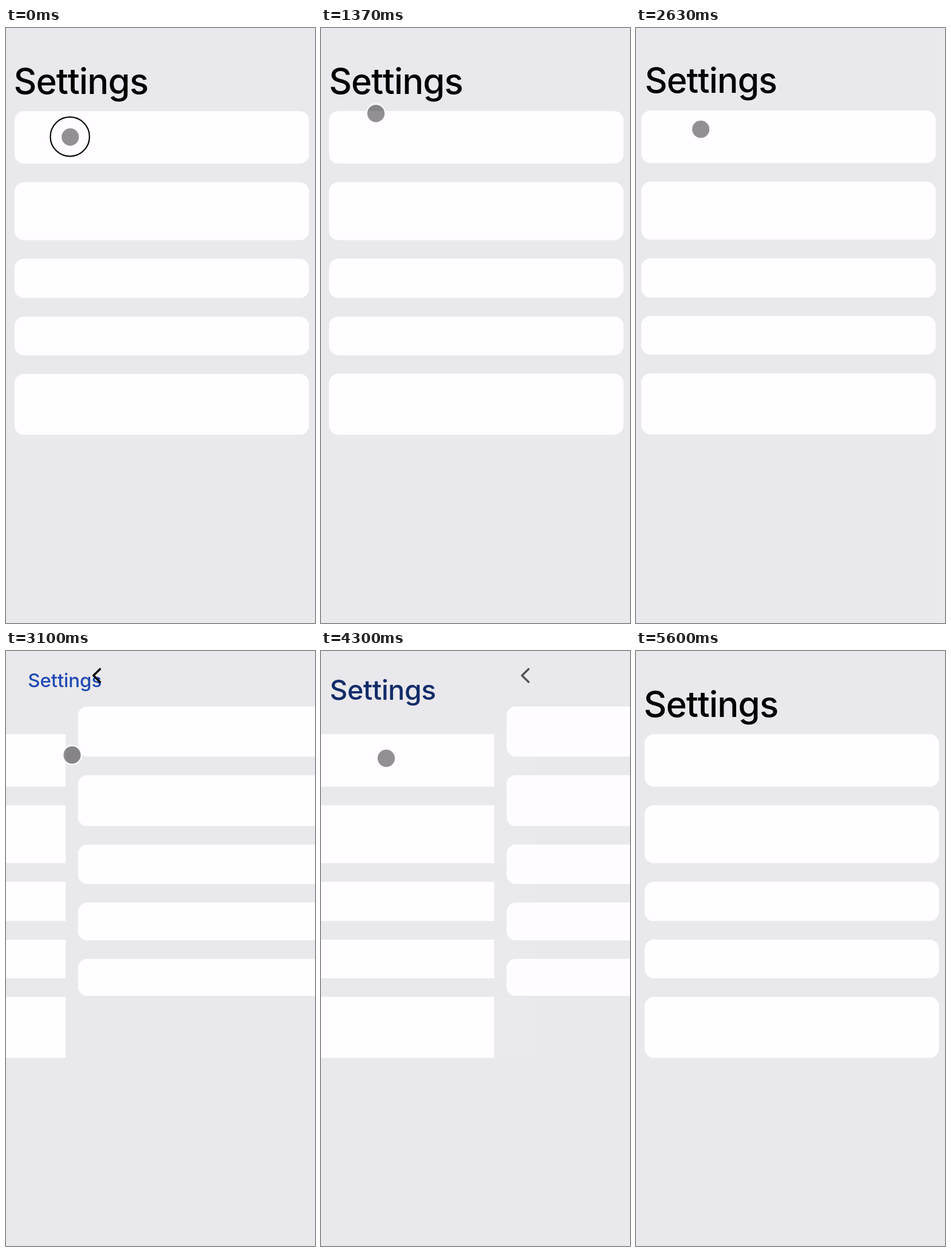
These frames come from a looping animation (540 px wide and 1037 px high, 6560 ms). An HTML page with a canvas:

```html
<!DOCTYPE html>
<html lang="en">
<head>
<meta charset="utf-8">
<title>Settings</title>
<style>
  html, body { margin: 0; width: 100%; height: 100%; overflow: hidden; background: #e9e8ec; }
  canvas { display: block; width: 540px; height: 1037px; }
</style>
</head>
<body>
<canvas id="stage" width="540" height="1037"></canvas>
<script>
const ctx = document.getElementById('stage').getContext('2d');
const W = 540, H = 1037, LOOP = 6560;
const BG = '#e9e8ec', CARD = '#fffdff';
const SPRING = 0.016, PARALLAX = 360, TRAVEL = 350, RING_TIME = 200;
const CARD_GAP = 32.4, POINTER_END = 5600;

const mainPage = { top: 145, heights: [91.4, 101, 68.4, 67.3, 106.4] };
const detailPage = { top: 96.7, heights: [87.3, 88.7, 68.5, 65.8, 64.5] };

// Taps alternately open the detail page and go back
const tap = (down, slide, x, y) => ({ down, slide, x, y });
const taps = [
  tap(-100, 270, 112.3, 190), tap(750, 860, 62, 66),
  tap(1503, 1560, 112, 188), tap(2188, 2250, 62, 66),
  tap(2700, 2916, 119, 189), tap(3401, 3626, 56, 48.5),
  tap(4031, 4210, 114, 187), tap(4700, 4860, 56, 44)
];
const stops = [...taps, tap(5370, Infinity, 353, 139)];

const lerp = (a, b, p) => a + (b - a) * p;
const clamp = v => Math.max(0, Math.min(1, v));
const smooth = u => u * u * (3 - 2 * u);

// Critically damped spring between the two pages
function transitionAt(t) {
  const index = taps.findLastIndex(({ slide }) => t >= slide);
  if (index < 0) return { shown: 0, pushing: false };
  const s = (t - taps[index].slide) * SPRING;
  const remaining = s > 9.2 ? 0 : (1 + s) * Math.exp(-s);
  const pushing = index % 2 === 0;
  return { shown: pushing ? 1 - remaining : remaining, pushing };
}

function pointerAt(t) {
  const index = stops.findLastIndex(({ down }) => t >= down - TRAVEL);
  const to = stops[index], from = stops[index - 1] ?? to;
  const p = smooth(clamp(1 + (t - to.down) / TRAVEL));
  return [lerp(from.x, to.x, p), lerp(from.y, to.y, p)];
}

function drawCards({ top, heights }, dx, dy) {
  ctx.fillStyle = CARD;
  let y = top + dy;
  for (const height of heights) {
    ctx.beginPath();
    ctx.roundRect(15 + dx, y, 514.5, height, 16);
    ctx.fill();
    y += height + CARD_GAP;
  }
}

function drawTitle(p, pushing) {
  // On the way in, the title shrinks late and stays left until the end
  const size = lerp(62, 24, pushing ? p ** 1.4 : p);
  const x = lerp(13.5, 79.2, pushing ? p ** 5 : p);
  ctx.font = `500 ${size}px Inter, sans-serif`;
  ctx.letterSpacing = `${lerp(-0.017, 0, p) * size}px`;
  ctx.fillStyle = `rgb(${38 * p}, ${90 * p}, ${217 * p})`;
  ctx.fillText('Settings', x, lerp(115.2, 52.3, p));
}

function drawArrow(dx, alpha) {
  ctx.globalAlpha = alpha;
  ctx.strokeStyle = '#000';
  ctx.lineWidth = 3.6;
  ctx.lineCap = ctx.lineJoin = 'round';
  ctx.beginPath();
  ctx.moveTo(53.5 + dx, 31.5);
  ctx.lineTo(42 + dx, 42.8);
  ctx.lineTo(53.5 + dx, 54);
  ctx.stroke();
  ctx.globalAlpha = 1;
}

function circle(x, y, r) {
  ctx.beginPath();
  ctx.arc(x, y, r, 0, 2 * Math.PI);
}

function strokeCircle(x, y, r, color, width) {
  circle(x, y, r);
  ctx.strokeStyle = color;
  ctx.lineWidth = width;
  ctx.stroke();
}

function drawPointer(t) {
  const [x, y] = pointerAt(t);
  circle(x, y, 15.2);
  ctx.fillStyle = 'rgba(13, 11, 15, 0.45)';
  ctx.fill();
  strokeCircle(x, y, 16.5, 'rgba(255, 255, 255, 0.75)', 2.6);
  const pressed = taps.some(({ down, slide }) =>
    t >= down && t < Math.min(down + RING_TIME, slide));
  if (pressed) strokeCircle(x - 0.6, y - 0.6, 34.2, '#000', 2.2);
}

function draw(t) {
  const { shown, pushing } = transitionAt(t);
  const detailX = (1 - shown) * W;

  ctx.fillStyle = BG;
  ctx.fillRect(0, 0, W, H);
  drawCards(mainPage, -PARALLAX * shown, pushing ? 0 : -60 * shown);

  ctx.globalAlpha = clamp(2.2 * shown);
  ctx.fillStyle = BG;
  ctx.fillRect(detailX - 6.5, 0, W + 7, H);
  drawCards(detailPage, detailX, 0);

  ctx.globalAlpha = 1;
  drawTitle(shown ** 0.85, pushing);
  drawArrow(detailX, clamp(2 * shown - 0.2));
  if (t < POINTER_END) drawPointer(t);
}

const begin = performance.now();
function tick() {
  draw((performance.now() - begin) % LOOP);
  requestAnimationFrame(tick);
}
tick();
</script>
</body>
</html>
```
